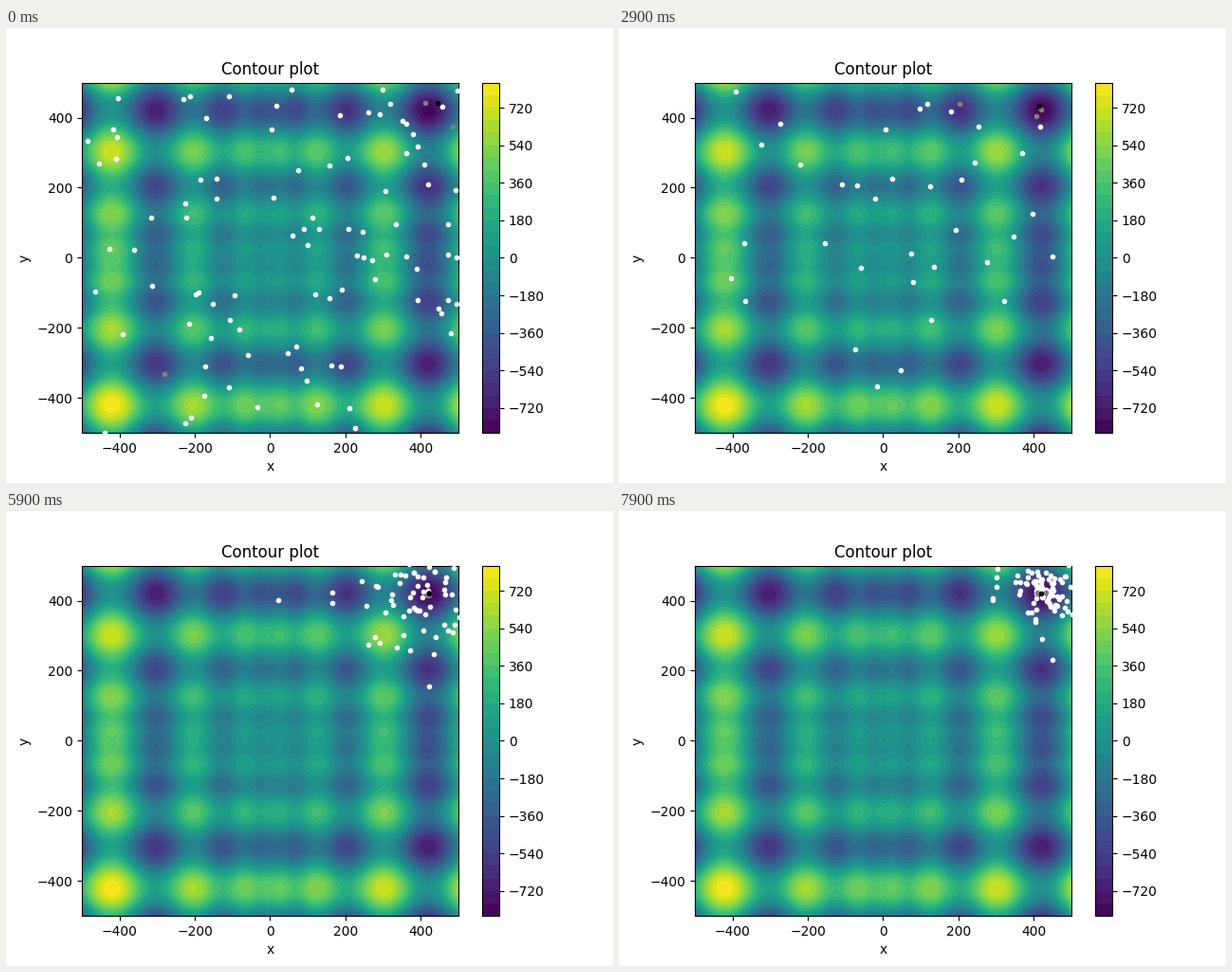
Animation of 640x480 px, one loop 8 s. Source, as a matplotlib script:

```python
import numpy as np
import matplotlib.pyplot as plt
from matplotlib.animation import FuncAnimation

FRAMES, STEP_MS, PACK = 80, 100, 96
LIMIT = 500
OPTIMUM = np.array([421, 421])
FAR_BASIN, NEAR_BASIN = (-303, -303), (204, 421)
PULLED_CENTRE = np.array([300, 350])
LEAVE_FAR, LEAVE_NEAR = 6, 55  # steps at which a stuck runner-up moves on


def schwefel(x, y):
    return -x * np.sin(np.sqrt(np.abs(x))) - y * np.sin(np.sqrt(np.abs(y)))


def spread(k):
    """The pack first bursts outwards, then closes in exponentially."""
    return min(340 + 16 * k, 640 * np.exp((19 - k) / 23.2))


def pack_at(k):
    rng = np.random.default_rng(100 + k)
    if k == 0:
        return rng.uniform(-LIMIT, LIMIT, (PACK, 2))
    if k < LEAVE_NEAR:
        centre = PULLED_CENTRE * min(1, 0.4 + k / 25)
    else:
        centre = OPTIMUM + 8
    return rng.logistic(centre, 0.55 * spread(k), (PACK, 2))


def best_at(k):
    """Held between improvements, circling in on the optimum."""
    leap = k // 10
    radius = 31 * np.exp(-(leap / 2) ** 2 / 1.4)
    angle = np.radians(40 - 143 * leap)
    return OPTIMUM + radius * np.array([np.cos(angle), np.sin(angle)])


def runners_at(k):
    rng = np.random.default_rng(500 + k // 3)
    spots = np.tile(OPTIMUM, (3, 1))
    if k < LEAVE_FAR:
        spots[0] = FAR_BASIN
    elif k < LEAVE_NEAR:
        spots[0] = NEAR_BASIN
    return spots + rng.normal(0, 8 + 25 * np.exp(-k / 25), (3, 2))


fig, ax = plt.subplots(figsize=(6.4, 4.8), dpi=100)
axis = np.linspace(-LIMIT, LIMIT, 100)
X, Y = np.meshgrid(axis, axis)
field = ax.contourf(X, Y, schwefel(X, Y), levels=np.arange(-840, 841, 60),
                    cmap="viridis")
fig.colorbar(field)
ax.set(title="Contour plot", xlabel="x", ylabel="y",
       xlim=(-LIMIT, LIMIT), ylim=(-LIMIT, LIMIT))

pack, runners, best = (
    ax.plot([], [], "o", ms=3, color=color, zorder=z)[0]
    for z, color in enumerate(("white", "gray", "black"), 3)
)


def update(k):
    pack.set_data(*pack_at(k).T)
    runners.set_data(*runners_at(k).T)
    best.set_data(*best_at(k)[:, None])
    return pack, runners, best


anim = FuncAnimation(fig, update, frames=FRAMES, interval=STEP_MS,
                     init_func=lambda: update(0), repeat=True, repeat_delay=0)
plt.show()
```
